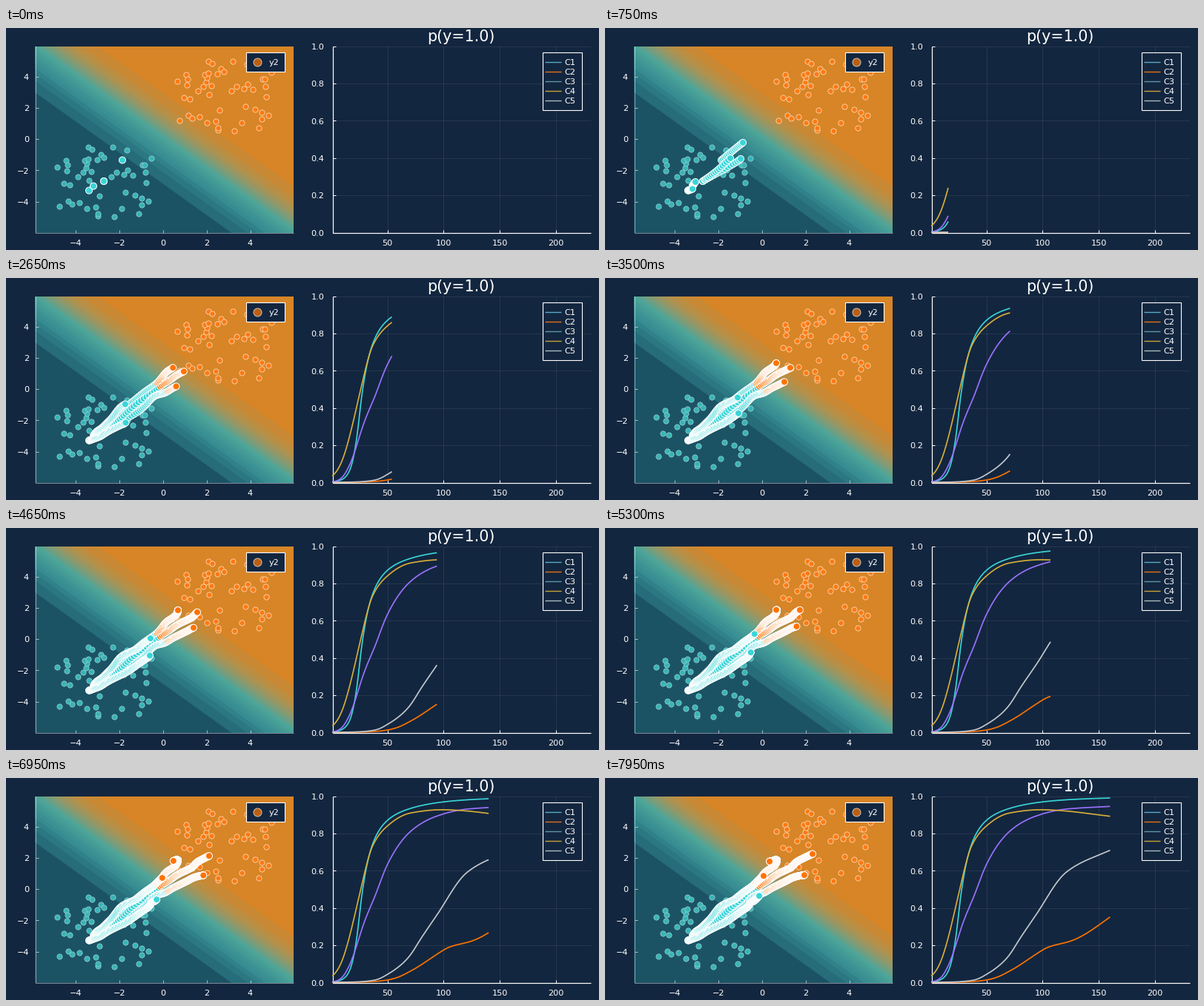
A matplotlib script for the animation above (8000 ms loop, 800x300 px).

```python
import numpy as np
import matplotlib.pyplot as plt
from matplotlib.animation import FuncAnimation
from matplotlib.patches import Polygon, Rectangle

W, H, DPI = 800, 300, 100
PX = 72 / DPI
STEPS, INTERVAL = 160, 50

BG = "#13263f"
CYAN, ORANGE = "#39d5d8", "#ff7300"
LINES = [CYAN, ORANGE, "#9a72ff", "#d6ae3a", "#c3c8cc"]
KEYS = ["#58a9c6", "#e8700f", "#5b97a6", "#c9a138", "#a9bcbc"]

plt.rcParams["font.family"] = "DejaVu Sans"
fig = plt.figure(figsize=(W / DPI, H / DPI), dpi=DPI, facecolor=BG)
ax = fig.add_axes([0, 0, 1, 1])
ax.set_xlim(0, W)
ax.set_ylim(H, 0)
ax.axis("off")


def logit(p):
    p = np.asarray(p, float)
    return np.log(p / (1 - p))


def smooth(k, v, t):
    """Shape-preserving cubic through the points (k, v)."""
    k, v = np.array(k, float), np.array(v, float)
    h = np.diff(k)
    d = np.diff(v) / h
    m = np.empty(len(k))
    m[0], m[-1] = d[0], d[-1]
    for i in range(1, len(d)):
        a, b = 2 * h[i] + h[i - 1], h[i] + 2 * h[i - 1]
        same = d[i - 1] * d[i] > 0
        m[i] = (a + b) / (a / d[i - 1] + b / d[i]) if same else 0
    j = np.clip(np.searchsorted(k, t, side="right") - 1, 0, len(d) - 1)
    s = (t - k[j]) / h[j]
    return ((1 + 2 * s) * (1 - s) ** 2 * v[j] + s * (1 - s) ** 2 * h[j] * m[j]
            + s * s * (3 - 2 * s) * v[j + 1] + s * s * (s - 1) * h[j] * m[j + 1])


def line(x0, y0, x1, y1, color="white", lw=1.0, z=2, alpha=1.0):
    ax.plot([x0, x1], [y0, y1], color=color, lw=lw * PX, zorder=z, alpha=alpha,
            solid_capstyle="butt")


def label(x, y, s, size=11.3, ha="center"):
    ax.text(x, y, s, fontsize=size * PX, color="white", ha=ha, va="baseline", zorder=9)


def box(x0, y0, x1, y1):
    ax.add_patch(Rectangle((x0, y0), x1 - x0, y1 - y0, fc=BG, ec="white",
                           lw=1.1 * PX, zorder=8))


def dots(x, y, color, diameter, edge, lw, z):
    return ax.scatter(x, y, s=(diameter * PX) ** 2, c=color, edgecolors=edge,
                      linewidths=lw * PX, zorder=z)


# Panels in pixels
L0, L1, R0, R1, TOP, BOT = 39.5, 387.5, 440.5, 788.5, 24.5, 276.5


def left_x(v): return 211.7 + 29.45 * v
def left_y(v): return 150.2 - 21.08 * v
def right_x(v): return 440.2 + 1.517 * (v - 1)
def right_y(p): return BOT - (BOT - TOP) * p


# Height in the left panel at which the classifier gives probability p
def level_y(x, p): return 26 - 20.8 * logit(p) + 0.716 * (x - L0)


# Filled probability bands
STOPS = {0: "#1c5364", .05: "#266c7a", .2: "#368c91", .5: "#4ea599",
         .7: "#8e996c", .8: "#ae9250", .95: "#d78526"}


def band_color(p):
    rgb = np.array([plt.matplotlib.colors.to_rgb(c) for c in STOPS.values()])
    return [np.interp(p, list(STOPS), rgb[:, c]) for c in range(3)]


panel = Rectangle((L0 - .5, TOP), L1 - L0 + .5, BOT - TOP, fc=band_color(0), lw=0, zorder=1)
ax.add_patch(panel)
for p in np.arange(0.05, 0.96, 0.05):
    a, b = L0 - 1, L1 + 1
    band = Polygon([(a, level_y(a, p)), (b, level_y(b, p)), (b, -H), (a, -H)],
                   fc=band_color(p), lw=0, zorder=1.1)
    ax.add_patch(band)
    band.set_clip_path(panel)

# Left axes
line(L0, TOP, L0, BOT, alpha=.45)
line(L0, BOT, L1, BOT, alpha=.45)
for v in range(-4, 5, 2):
    name = str(v).replace("-", "\u2212")
    line(left_x(v), BOT, left_x(v), BOT - 4, alpha=.6)
    line(L0, left_y(v), L0 + 4, left_y(v), alpha=.6)
    label(left_x(v), 294, name)
    label(31, left_y(v) + 4.2, name, ha="right")

# Right axes
for v in range(50, 201, 50):
    line(right_x(v), TOP, right_x(v), BOT, alpha=.08)
    line(right_x(v), BOT, right_x(v), BOT - 4)
    label(right_x(v), 294, str(v))
for k in range(6):
    y = right_y(k / 5)
    line(R0, y, R1, y, alpha=.08)
    line(R0, y, R0 + 4, y)
    label(429.5, y + 4.2, f"{k / 5:.1f}", ha="right")
line(R0, TOP, R0, BOT + .5, lw=1.2)
line(R0, BOT, R1, BOT, lw=1.2)
label(614, 18.5, "p(y=1.0)", size=20.7)

# Legends
box(323.5, 32.5, 375.5, 58.5)
dots([339.3], [45.8], "#bb5f14", 11, "#c9c3b8", 1, 9)
label(354.5, 50, "y2", ha="left")
box(723.5, 32.5, 776.5, 110.5)
for k, color in enumerate(KEYS):
    y = 46 + 13 * k
    line(727, y - .5, 749, y - .5, color=color, lw=1.4, z=9)
    label(753.5, y + 4.2, f"C{k + 1}", ha="left")

# Two classes share one cloud, shifted
CLOUD = np.array([
    (69, 188), (81, 179), (83, 185), (82, 193), (78, 210), (86, 212), (72, 241),
    (84, 234), (89, 238), (99, 236), (109, 244), (121, 242), (124, 254), (124, 251),
    (146, 255), (126, 227), (97, 201), (104, 195), (108, 189), (109, 183),
    (106, 179), (111, 177), (115, 194), (111, 161), (116, 164), (123, 178), (128, 171),
    (132, 175), (144, 161), (163, 165), (142, 201), (149, 195), (159, 198), (164, 192),
    (171, 199), (161, 222), (174, 226), (183, 230), (183, 239), (192, 234), (179, 251),
    (156, 244), (184, 185), (187, 185), (188, 195), (189, 209), (196, 176), (112, 206)])
dots(*CLOUD.T, "#38b4b7", 7.2, "#8fd0d0", .8, 3)
dots(*(CLOUD + (162, -116)).T, "#fb7a14", 7.2, "#ffd3a8", .9, 3)

# Class probability by step
PROBS = [
    {1: .004, 10: .018, 16: .06, 22: .21, 28: .5, 37: .745, 50: .87, 71: .935,
     120: .98, 160: .99},
    {1: .0011, 16: .0015, 37: .0055, 50: .014, 71: .063, 94: .152, 105: .19,
     126: .225, 160: .352},
    {1: .004, 16: .09, 28: .3, 40: .48, 50: .633, 71: .813, 94: .893, 120: .93,
     160: .945},
    {1: .036, 16: .24, 28: .545, 37: .735, 50: .84, 71: .91, 98: .927, 160: .892},
    {1: .0018, 16: .0027, 37: .0115, 50: .044, 70: .145, 80: .238, 94: .362,
     121: .592, 160: .71}]

# Horizontal position at shared steps
MARKS = [1, 16, 28, 37, 71, 94, 121, 160]
TRACKS = [
    [132, 169, 208, 224, 250, 258, 268, 280],
    [112, 118, 130, 140, 180, 194, 199, 208],
    [132, 183, 201, 213, 242, 253, 263, 269],
    [157, 186, 205, 214, 231, 232, 229, 222],
    [118, 122, 132, 141, 179, 195, 207, 214]]

steps = np.arange(1, STEPS + 1)
probs = np.array([1 / (1 + np.exp(-smooth(list(k), logit(list(k.values())), steps)))
                  for k in PROBS])
xs = np.array([smooth(MARKS, x, steps) for x in TRACKS])
ys = level_y(xs, probs)

# Newest positions are painted last
spots = np.column_stack([xs.T.ravel(), ys.T.ravel()])
fills = np.where(probs.T.ravel() < .5, CYAN, ORANGE)
trail = dots([], [], CYAN, 9, "white", 1, 5)
curves = [ax.plot([], [], color=c, lw=1.7 * PX, zorder=6, solid_capstyle="butt")[0]
          for c in LINES]


def update(i):
    n = len(TRACKS) * (i + 1)
    trail.set_offsets(spots[:n])
    trail.set_facecolor(list(fills[:n]))
    for curve, p in zip(curves, probs):
        curve.set_data(right_x(steps[:i + 1]), right_y(p[:i + 1]))
    return [trail, *curves]


anim = FuncAnimation(fig, update, frames=STEPS, interval=INTERVAL,
                     repeat=True, repeat_delay=0)
plt.show()
```
